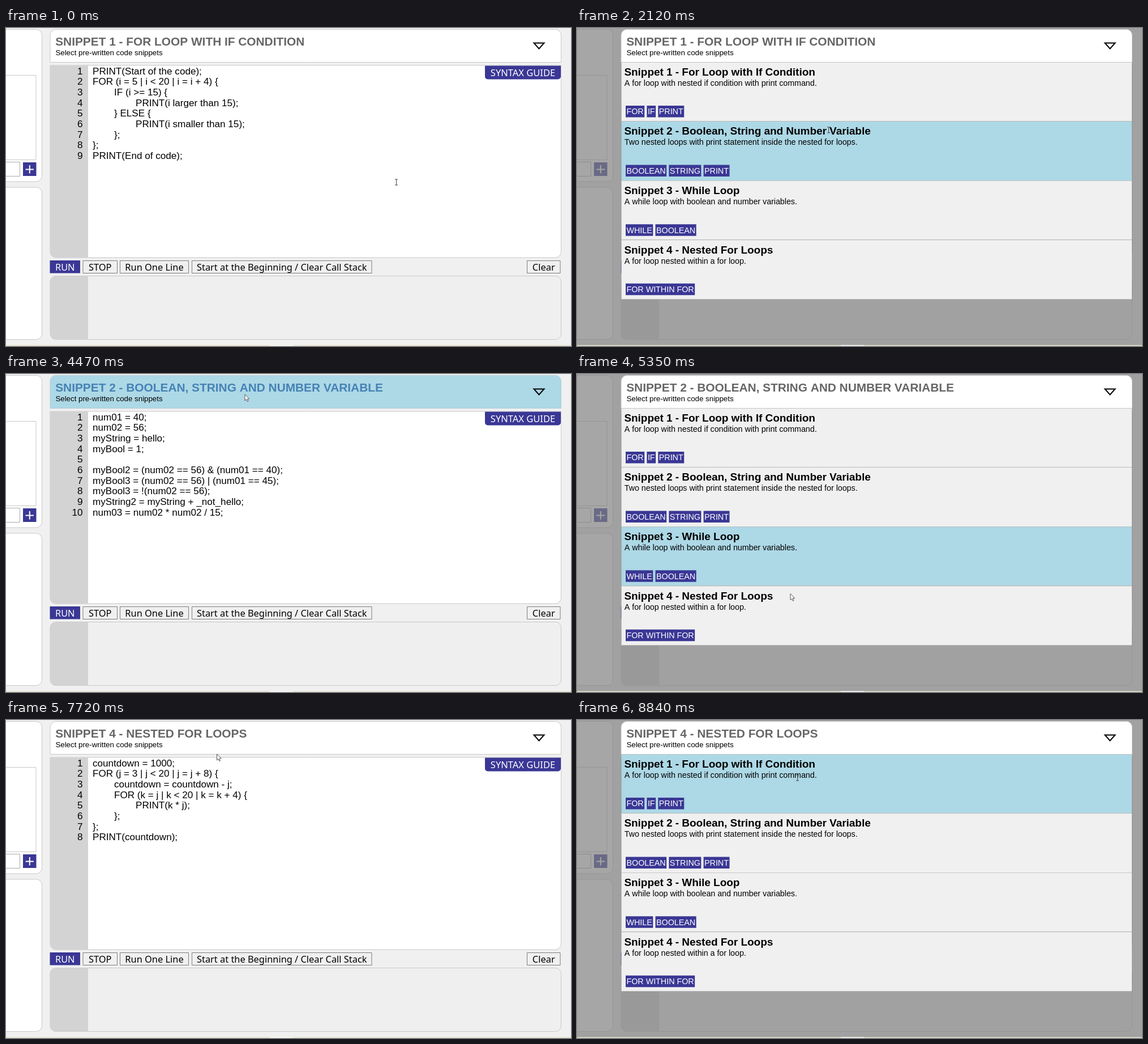
An HTML page with a canvas that plays this animation: 998 px wide and 561 px high, repeating every 9.26 s.

```html
<!DOCTYPE html>
<html lang="en">
<head>
<meta charset="utf-8">
<title>Code snippets</title>
<style>
html, body { margin: 0; width: 100%; height: 100%; overflow: hidden; background: #f0f0f0; }
canvas { display: block; }
</style>
</head>
<body>
<canvas id="stage" width="998" height="561"></canvas>
<script>
const ctx = document.getElementById('stage').getContext('2d');
const LOOP = 9260, HOVER_LAG = 60, ITEM_TOP = 60.5, ITEM_H = 104.6;
const SANS = '"Liberation Sans", Arial, sans-serif';
const UI = '"Noto Sans", "Open Sans", sans-serif';
const NAVY = '#3a3795', BLUE = '#add8e6', GUTTER = '#d3d3d3', LINE = '#c8c8c8';

const snippets = [
  { title: 'Snippet 1 - For Loop with If Condition',
    about: 'A for loop with nested if condition with print command.',
    tags: ['FOR', 'IF', 'PRINT'],
    code: `PRINT(Start of the code);
FOR (i = 5 | i < 20 | i = i + 4) {
\tIF (i >= 15) {
\t\tPRINT(i larger than 15);
\t} ELSE {
\t\tPRINT(i smaller than 15);
\t};
};
PRINT(End of code);` },
  { title: 'Snippet 2 - Boolean, String and Number Variable',
    about: 'Two nested loops with print statement inside the nested for loops.',
    tags: ['BOOLEAN', 'STRING', 'PRINT'],
    code: `num01 = 40;
num02 = 56;
myString = hello;
myBool = 1;

myBool2 = (num02 == 56) & (num01 == 40);
myBool3 = (num02 == 56) | (num01 == 45);
myBool3 = !(num02 == 56);
myString2 = myString + _not_hello;
num03 = num02 * num02 / 15;` },
  { title: 'Snippet 3 - While Loop',
    about: 'A while loop with boolean and number variables.',
    tags: ['WHILE', 'BOOLEAN'] },
  { title: 'Snippet 4 - Nested For Loops',
    about: 'A for loop nested within a for loop.',
    tags: ['FOR WITHIN FOR'],
    code: `countdown = 1000;
FOR (j = 3 | j < 20 | j = j + 8) {
\tcountdown = countdown - j;
\tFOR (k = j | k < 20 | k = k + 4) {
\t\tPRINT(k * j);
\t};
};
PRINT(countdown);` }
];

// Pointer hotspot: time, x, y
const path = [
  [0, 689, 272], [40, 689, 272], [920, 433, 36], [1480, 433, 36], [1600, 434.5, 62],
  [2400, 449, 243], [2440, 449, 241], [2850, 449, 241], [3490, 452, 226], [3950, 452, 226],
  [4470, 422, 36], [5150, 422, 36], [5350, 377, 387.5], [5590, 358, 421], [6550, 358, 421],
  [6790, 357, 419], [6910, 357, 419], [6950, 361, 418], [7280, 361, 418],
  [7720, 372.5, 60], [8200, 380, 35], [8240, 380, 35], [8840, 389, 102], [LOOP, 389, 102]
];

function pointer(t) {
  const i = path.findIndex(p => p[0] > t);
  const a = path[i - 1], b = path[i], k = (t - a[0]) / (b[0] - a[0]);
  return { x: a[1] + (b[1] - a[1]) * k, y: a[2] + (b[2] - a[2]) * k };
}

function text(s, x, y, size, { color = '#000', family = SANS, bold = false, align = 'left' } = {}) {
  ctx.font = `${bold ? 'bold ' : ''}${size}px ${family}`;
  ctx.fillStyle = color;
  ctx.textAlign = align;
  ctx.fillText(s, x, y);
  return ctx.measureText(s).width;
}

function box(x, y, w, h, fill, stroke, radius = 0) {
  ctx.beginPath();
  ctx.roundRect(x, y, w, h, radius);
  if (fill) { ctx.fillStyle = fill; ctx.fill(); }
  if (stroke) { ctx.strokeStyle = stroke; ctx.lineWidth = 1; ctx.stroke(); }
}

function button(label, x, w, primary) {
  if (primary) box(x, 410, w, 22.5, NAVY);
  else box(x + .5, 410.5, w - 1, 22, '#f0f0f0', '#7d7d7d');
  text(label, x + w / 2, 427.6, 16.4, { color: primary ? '#fff' : '#000', family: UI, align: 'center' });
}

function drawSidebar() {
  box(-20, 2.5, 83.5, 268.5, '#fff', LINE, 10);
  box(-20, 281, 83.5, 268.5, '#fff', LINE, 10);
  box(-20, 83.5, 73, 149, null, LINE);
  box(-20, 236.5, 44.5, 25, '#fff', '#aaa');
  box(30, 237, 23.5, 24, NAVY);
  box(34.5, 248.5, 14.5, 2, '#fff');
  box(40.8, 242, 2, 14.5, '#fff');
}

function drawEditor(code) {
  box(78, 66, 902.5, 339, '#fff', LINE, [0, 0, 10, 10]);
  box(78, 66, 67, 339, GUTTER, null, [0, 0, 0, 10]);
  code.split('\n').forEach((line, i) => {
    const y = 81.8 + 18.64 * i;
    text(i + 1, 135.4, y, 17.1, { align: 'right' });
    text(line.replaceAll('\t', ' '.repeat(8)), 153, y, 17.1);
  });
  box(846, 66.5, 134, 24, NAVY, null, [0, 0, 5, 5]);
  text('SYNTAX GUIDE', 913, 85, 16.5, { color: '#fff', family: UI, align: 'center' });
  button('RUN', 77.5, 53.5, true);
  button('STOP', 135.5, 61.5);
  button('Run One Line', 201, 122);
  button('Start at the Beginning / Clear Call Stack', 328, 318.5);
  button('Clear', 920, 59.5);
  box(78, 437.5, 902.5, 112, '#efefef', LINE, 10);
  box(78, 437.5, 67, 112, GUTTER, null, [10, 0, 0, 10]);
}

function drawHeader(title, hover) {
  box(78, 2.5, 902.5, 58, hover ? BLUE : '#fff', hover ? '#b5cdd6' : LINE, [10, 10, 0, 0]);
  text(title.toUpperCase(), 87.2, 31.2, 20.85, { color: hover ? '#4682b4' : '#666', bold: true });
  text('Select pre-written code snippets', 87.4, 47.8, 13.3);
  ctx.beginPath();
  ctx.moveTo(932.5, 26.5);
  ctx.lineTo(950.5, 26.5);
  ctx.lineTo(941.5, 36.5);
  ctx.closePath();
  ctx.strokeStyle = '#000';
  ctx.lineWidth = 2;
  ctx.stroke();
}

// Draws the list and tells whether the pointer is over selectable text.
function drawMenu(hoverItem, p) {
  let overText = false;
  snippets.forEach((s, i) => {
    const top = ITEM_TOP + i * ITEM_H;
    box(78.5, top, 901.5, ITEM_H, i === hoverItem ? BLUE : '#f0f0f0');
    box(78.5, Math.round(top + ITEM_H) - 1, 901.5, 1, '#b9b9b9');
    if (!i) box(78.5, 60, 901.5, 1, '#c4c4c4');
    const titleW = text(s.title, 83.4, top + 23.2, 18.93, { bold: true });
    const aboutW = text(s.about, 83.8, top + 41.2, 14.23);
    const dy = p.y - top;
    overText ||= dy > 7 && dy < 28 && p.x < 83 + titleW;
    overText ||= dy >= 28 && dy < 45 && p.x < 83 + aboutW;
    let x = 86;
    for (const tag of s.tags) {
      ctx.font = `14.3px ${SANS}`;
      const w = ctx.measureText(tag).width + 3;
      box(x, top + 76.5, w, 20.5, NAVY);
      text(tag, x + 1.5, top + 91.9, 14.3, { color: '#fff' });
      x += w + 4.2;
    }
  });
  return overText;
}

function drawPointer({ x, y }, beam) {
  ctx.lineWidth = 1;
  if (beam) {
    x = Math.round(x) + .5;
    ctx.strokeStyle = '#444';
    ctx.beginPath();
    ctx.moveTo(x, y - 5);
    ctx.lineTo(x, y + 5);
    for (const end of [y - 5, y + 5]) {
      ctx.moveTo(x - 2.5, end);
      ctx.lineTo(x + 2.5, end);
    }
    ctx.stroke();
    return;
  }
  const arrow = [0, 0, 0, 11, 2.5, 8.7, 4.3, 12.6, 6, 11.9, 4.3, 8, 7.6, 7.8];
  ctx.beginPath();
  for (let i = 0; i < arrow.length; i += 2) ctx.lineTo(x + arrow[i], y + arrow[i + 1]);
  ctx.closePath();
  ctx.fillStyle = '#fff';
  ctx.fill();
  ctx.strokeStyle = '#555';
  ctx.stroke();
}

function draw(t) {
  const open = (t >= 1160 && t < 2810) || (t >= 4910 && t < 6010) || t >= 8240;
  const current = snippets[t < 2810 ? 0 : t < 6010 ? 1 : 3];
  const p = pointer(t), lagged = pointer(Math.max(0, t - HOVER_LAG));

  box(0, 0, 998, 561, '#f0f0f0');
  drawSidebar();
  drawEditor(current.code);
  if (open) box(0, 0, 998, 561, 'rgba(128,128,128,.7)');
  box(0, 559.5, 998, 1.5, '#e9e3cf');
  box(466, 559.5, 41, 1.5, '#fafafa');
  drawHeader(current.title, lagged.y < 60);

  let beam = !open && p.x > 145 && p.y > 66 && p.y < 405;
  if (open) beam = drawMenu(Math.floor((lagged.y - ITEM_TOP) / ITEM_H), p);
  drawPointer(p, beam);
}

const start = performance.now();
function tick() {
  draw((performance.now() - start) % LOOP);
  requestAnimationFrame(tick);
}
tick();
</script>
</body>
</html>
```
